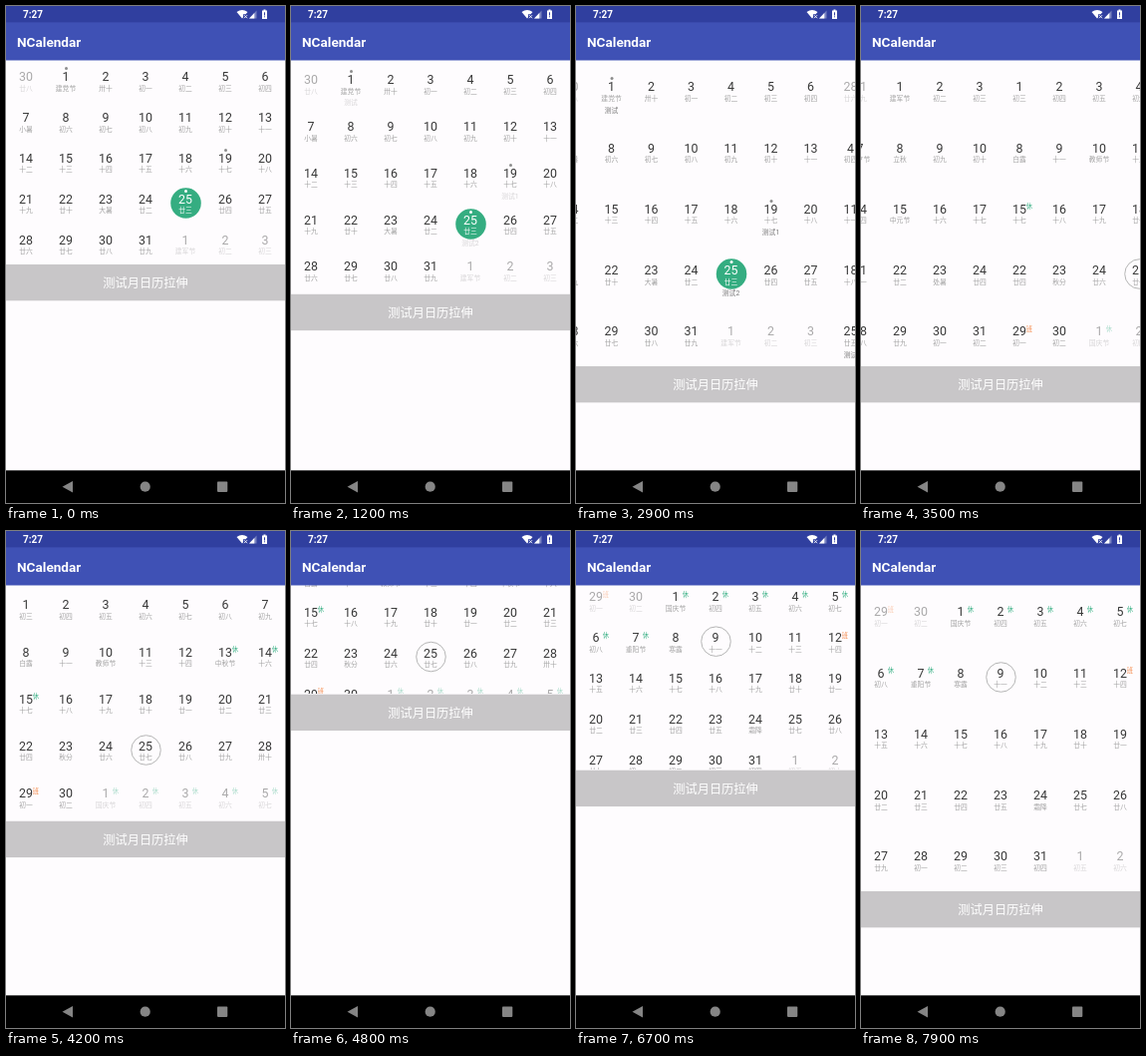
An HTML page for the animation above (8000 ms loop, 280 by 498 pixels).

```html
<!DOCTYPE html>
<html>
<head>
<meta charset="utf-8">
<title>NCalendar</title>
<style>
  @property --h { syntax: "<length>"; inherits: true; initial-value: 204.2px; }

  html, body { margin: 0; width: 100%; height: 100%; overflow: hidden; }
  body { background: #fefcfe; font-family: Roboto, "Noto Sans CJK SC", "Noto Sans CJK", sans-serif; }
  #stage { position: relative; width: 280px; height: 498px; overflow: hidden; background: #fefcfe; }
  #stage > * { position: absolute; left: 0; }

  .time { left: 17px; top: 0; color: #fff; font: 600 10px/17px Roboto, sans-serif; }
  #stage > .time { left: 17px; }
  #stage > .title { left: 11px; top: 17px; color: #fff; font: 600 13.6px/38px Roboto, sans-serif; }
  .chrome { top: 0; }

  /* --h is the visible calendar height; everything below follows it */
  .cal { top: 54.47px; width: 280px; height: var(--h); overflow: hidden; }
  .bar { top: 54px; width: 280px; height: 36.7px; transform: translateY(calc(var(--h) + .47px)); }
  .bar text { font-size: 12.2px; text-anchor: middle; }
  .months { display: flex; width: 1120px; height: max(204.2px, 100%); }
  .month {
    width: 280px; height: 100%; display: flex; flex-direction: column;
    transform: translateY(calc(min(0px, var(--h) - 204.2px) * var(--row) / 4));
  }
  .row { flex: 1; display: flex; width: 280px; }
  .weeks { position: absolute; left: 0; top: 0; width: 280px; height: 40.84px; background: #fefcfe; overflow: hidden; }
  .strip { display: flex; width: 840px; height: 40.84px; }

  .day { position: relative; width: 40px; height: 100%; text-align: center; white-space: nowrap; }
  .day > * { position: absolute; left: 0; width: 40px; }
  .num { top: calc(50% - 10.7px); font-size: 12.4px; line-height: 14px; color: #383838; }
  .lunar { top: calc(50% + 3.8px); font-size: 6.8px; line-height: 8px; color: #a2a2a2; }
  .day .note { top: calc(50% + 15.4px); font-size: 6.8px; line-height: 8px; color: #777; }
  .day .mark { left: 26px; width: 8px; top: calc(50% - 10.2px); font-size: 6.3px; line-height: 8px; color: #3bb186; }
  .day .work { color: #f58a4b; }
  .day .dot { left: 18.5px; top: calc(50% - 13.7px); width: 3px; height: 3px; border-radius: 50%; background: #8c8c8c; }
  .day .ring {
    left: 4.5px; top: calc(50% - 15.5px); width: 31px; height: 31px; box-sizing: border-box;
    border: 1px solid #b4b4b4; border-radius: 50%; transform: scale(.985);
  }
  .dim .num, .dim .lunar, .dim .mark { opacity: .42; }
  .today .ring { border: 0; background: #35ad81; }
  .today .num, .today .lunar { color: #fff; }
  .today .dot { background: #fff; }

  #stage, .months, .weeks, .strip, .note, .late { animation: 8s linear infinite; }
  #stage { animation-name: stretch; }
  .months { animation-name: months; }
  .weeks { animation-name: weeks; }
  .strip { animation-name: strip; }
  .note { animation-name: note; }
  .late { animation-name: late; }

  @keyframes stretch {
    0%, 11.25% { --h: 204.2px; }
    21.25% { --h: 283.7px; }
    22.5% { --h: 289px; }
    26.25%, 35.5% { --h: 305px; }
    36.25%, 50% { --h: 306.3px; }
    52.5% { --h: 236.2px; }
    54.375% { --h: 204.2px; }
    61.25% { --h: 88px; }
    63.75%, 78.75% { --h: 40.84px; }
    83.75% { --h: 184.6px; }
    84.5% { --h: 204.2px; }
    92.5%, 98% { --h: 305px; }
    98.75%, 100% { --h: 306.3px; }
  }
  @keyframes months {
    0%, 35.5% { transform: translateX(0); }
    36.25% { transform: translateX(-23.5px); }
    37.5% { transform: translateX(-120px); }
    38.75% { transform: translateX(-225px); }
    40% { transform: translateX(-268px); }
    41.25% { transform: translateX(-280px); }
    42.5% { transform: translateX(-310px); }
    43.75% { transform: translateX(-420px); }
    45% { transform: translateX(-520px); }
    46.25% { transform: translateX(-558.5px); }
    47.5%, 70% { transform: translateX(-560px); }
    70.01%, 100% { transform: translateX(-840px); }
  }
  @keyframes weeks {
    0%, 63.74% { visibility: hidden; }
    63.75%, 78.75% { visibility: visible; }
    78.76%, 100% { visibility: hidden; }
  }
  @keyframes strip {
    0%, 67.5% { transform: translateX(0); }
    68.75% { transform: translateX(-35px); }
    70% { transform: translateX(-128.7px); }
    71.25% { transform: translateX(-235px); }
    72.5%, 73.25% { transform: translateX(-280px); }
    74.5% { transform: translateX(-350px); }
    75.75% { transform: translateX(-460px); }
    77% { transform: translateX(-540px); }
    78%, 100% { transform: translateX(-560px); }
  }
  @keyframes note {
    0%, 11.25% { opacity: 0; }
    21.25% { opacity: .8; }
    26.25%, 100% { opacity: 1; }
  }
  @keyframes late {
    0%, 36.9% { opacity: 0; }
    36.91%, 100% { opacity: 1; }
  }
</style>
</head>
<body>
<div id="stage">
  <div class="cal">
    <div class="months"></div>
    <div class="weeks"><div class="strip"></div></div>
  </div>
  <svg class="bar" viewBox="0 0 280 36.7">
    <rect width="280" height="36.7" fill="#c8c6c8"/>
    <text x="140" y="23.2" fill="#fff">测试月日历拉伸</text>
  </svg>
  <svg class="chrome" width="280" height="498" fill="#fff">
    <rect width="280" height="54.47" fill="#3f51b5"/>
    <rect width="280" height="16.34" fill="#303f9f"/>
    <path d="M231.5 6Q237 1.8 242.5 6L240.6 8.2H238V11.3L237 12.4Z"/>
    <path d="M239 9.2l3 3m0-3l-3 3" stroke="#fff" stroke-width=".9"/>
    <path d="M244 12.5L251.5 4.5V12.5Z" opacity=".35"/>
    <path d="M244 12.5L249.3 6.9V12.5Z"/>
    <path d="M258.5 3.5h2v1h1.5v8.5h-5V4.5h1.5Z"/>
    <path d="M259.5 6.3v3.2m0 .8v1" stroke="#303f9f"/>
    <rect y="465.33" width="280" height="33" fill="#000"/>
    <g fill="#858585">
      <path d="M56.5 481.7L67 476V487.4Z"/>
      <circle cx="139.7" cy="481.7" r="5.1"/>
      <rect x="212" y="476.6" width="10.3" height="10.3" rx=".8"/>
    </g>
  </svg>
  <div class="time">7:27</div>
  <div class="title">NCalendar</div>
</div>
<script>
  const DAY = 864e5;
  const at = (month, day) => Date.UTC(2019, month - 1, day);
  const DIGITS = '十一二三四五六七八九';
  const NEW_MOONS = [at(6, 3), at(7, 3), at(8, 1), at(8, 30), at(9, 29), at(10, 28)];
  const FESTIVALS = {
    '7-1': '建党节', '7-7': '小暑', '7-23': '大暑', '8-1': '建军节', '8-7': '七夕节',
    '8-8': '立秋', '8-15': '中元节', '8-23': '处暑', '9-8': '白露', '9-10': '教师节',
    '9-13': '中秋节', '9-23': '秋分', '10-1': '国庆节', '10-7': '重阳节', '10-8': '寒露', '10-24': '霜降'
  };
  const NOTES = { '7-1': '测试', '7-19': '测试1', '7-25': '测试2', '8-25': '测试' };
  const DOTS = ['7-1', '7-19', '7-25'];
  const WORK = ['9-29', '10-12'];

  function lunar(time) {
    const start = NEW_MOONS.filter(m => m <= time).pop();
    const d = (time - start) / DAY + 1;
    return d === 10 ? '初十' : '初十廿卅'[Math.floor(d / 10)] + DIGITS[d % 10];
  }

  const isRest = (m, d) => (m === 9 && d >= 13 && d <= 15) || (m === 10 && d <= 7);
  const part = (cls, text = '') => `<div class="${cls}">${text}</div>`;

  // month: the month in focus, or 0 to show every day at full strength
  function dayCell(time, month, picked) {
    const date = new Date(time);
    const m = date.getUTCMonth() + 1, d = date.getUTCDate(), key = m + '-' + d;
    const inside = !month || m === month;
    const isPicked = time === picked;
    let html = '';
    if (isPicked) html += part(m === 8 ? 'ring late' : 'ring');
    html += part('num', d) + part('lunar', FESTIVALS[key] || lunar(time));
    if (isRest(m, d)) html += part('mark', '休');
    if (WORK.includes(key)) html += part('mark work', '班');
    if (inside && DOTS.includes(key)) html += part('dot');
    if (inside && NOTES[key]) html += part('note', NOTES[key]);
    const state = (inside ? '' : ' dim') + (isPicked && key === '7-25' ? ' today' : '');
    return part('day' + state, html);
  }

  function weekRow(start, month, picked) {
    let cells = '';
    for (let i = 0; i < 7; i++) cells += dayCell(start + i * DAY, month, picked);
    return part('row', cells);
  }

  function monthPage(month, day) {
    const first = at(month, 1), picked = at(month, day);
    const start = first - new Date(first).getUTCDay() * DAY;
    const pickedRow = Math.floor((picked - start) / DAY / 7);
    let rows = '';
    for (let r = 0; r < 5; r++) rows += weekRow(start + r * 7 * DAY, month, picked);
    return `<div class="month" style="--row: ${pickedRow}">${rows}</div>`;
  }

  document.querySelector('.months').innerHTML =
    [[7, 25], [8, 25], [9, 25], [10, 9]].map(p => monthPage(...p)).join('');
  document.querySelector('.strip').innerHTML =
    [0, 7, 14].map(n => weekRow(at(9, 22 + n), 0, at(9, 25 + n))).join('');
</script>
</body>
</html>
```
